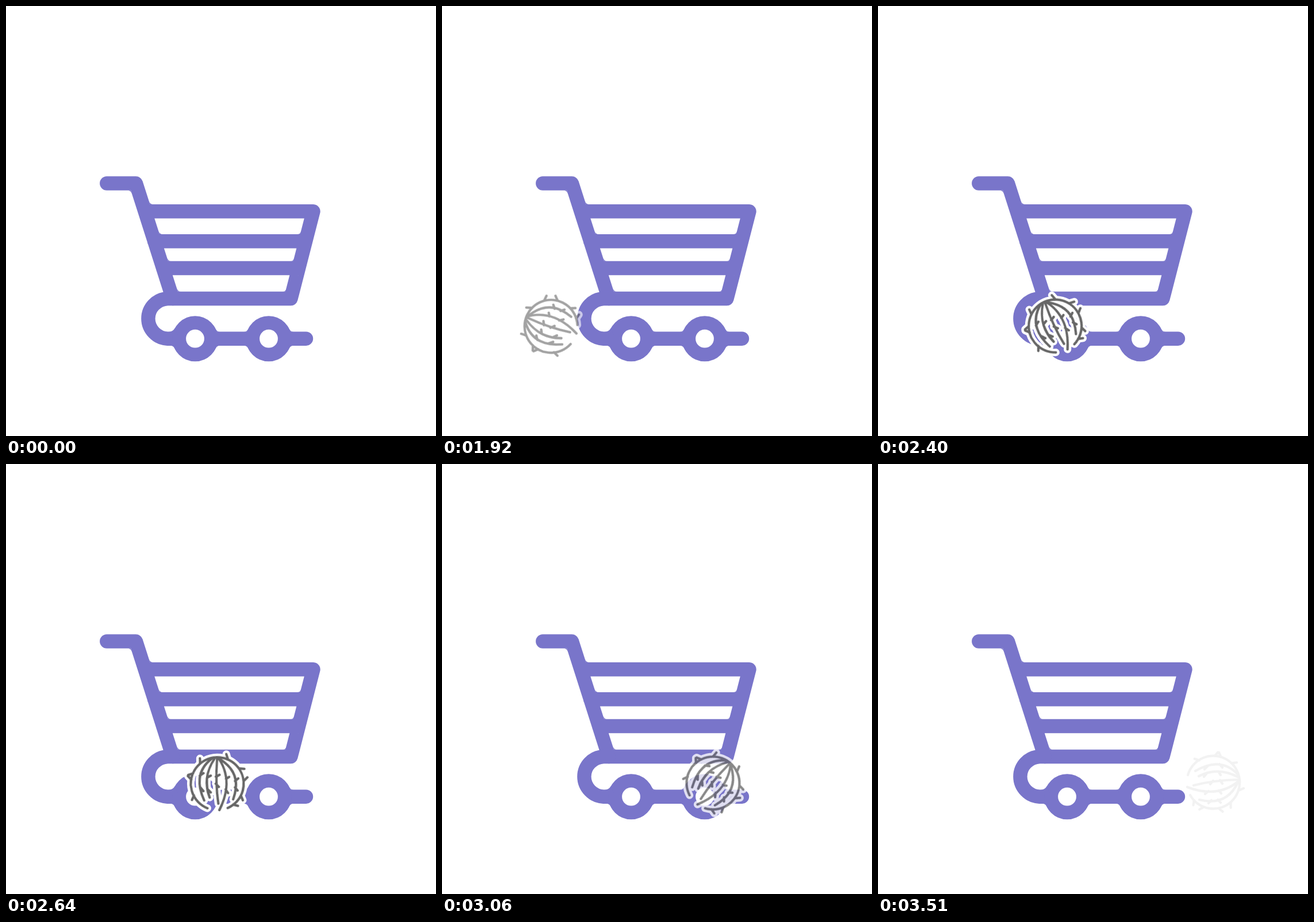
Animation of 748 by 748 pixels, one loop 9840 ms. Source, as an HTML page:

```html
<!DOCTYPE html>
<html lang="en">
<head>
<meta charset="utf-8">
<title>Cart and tumbleweed</title>
<style>
  html, body { margin: 0; width: 100%; height: 100%; overflow: hidden; background: #fff; }
  svg { display: block; width: 100vw; height: 100vh; }
  .line { fill: none; stroke-linecap: round; stroke-linejoin: round; }
</style>
</head>
<body>
<svg viewBox="0 0 748 748">
  <defs>
    <filter id="soft" x="-20%" y="-20%" width="140%" height="140%">
      <feGaussianBlur stdDeviation=".7"/>
    </filter>
    <path id="weed" class="line"/>
    <g id="wheel">
      <circle r="27.7" fill="#fff" stroke="#7975ca" stroke-width="23.6"/>
      <path id="flare" d="M34-20Q37-12 43-12H34ZM34 20Q37 12 43 12H34Z" fill="#7975ca"/>
      <use href="#flare" transform="scale(-1 1)"/>
    </g>
  </defs>

  <g class="line" stroke="#7975ca" stroke-width="24.4">
    <path d="M175.3 308.5H226L290 509H495.500L534.500 357.300H242M258 409.200H520M273 456H508"/>
    <path d="M290 509H281A35.500 34.900 0 0 0 281 578.700H522"/>
  </g>
  <path id="fillets" fill="#7975ca"/>
  <use href="#wheel" x="329" y="578.7"/>
  <use href="#wheel" x="457" y="578.7"/>
  <path d="M281 567Q290 567.500 294 560L300 575H281Z" fill="#7975ca"/>

  <g id="ball">
    <use href="#weed" stroke="#fff" stroke-width="13"/>
    <use href="#weed" stroke="#666" stroke-width="4.2" filter="url(#soft)"/>
  </g>
</svg>
<script>
const LOOP = 9840, START = 1650, END = 3510, STEP = 30;
const byId = id => document.getElementById(id);

// Rounds the inner corner between a slanted edge and a horizontal one.
const fillet = (x, y, slope, dir, rise = 6) =>
  `M${x - slope * rise} ${y - rise}Q${x} ${y} ${x + 5 * dir} ${y}L${x} ${y}Z`;

const LEFT = 0.318, RIGHT = -0.255;
let corners = fillet(250.6, 345.1, LEFT, 1) + fillet(217, 320.7, LEFT, -1, -6);
for (const y of [397, 443.8, 496.8]) {
  corners += fillet(243 + LEFT * (y - 321), y, LEFT, 1);
  corners += fillet(519 + RIGHT * (y - 370), y, RIGHT, -1);
}
byId('fillets').setAttribute('d', corners);

const polar = (radius, degrees) => {
  const a = degrees * Math.PI / 180;
  return `${radius * Math.cos(a)} ${radius * Math.sin(a)}`;
};
const ring = 'M41-22A46 46 0 1 0 45 13';
const stems = 'M-42 0Q-22-42 25-30M-43 2Q-6-28 46-8M-43 5Q0 4 35-5M-43 9Q-8 28 26 11M-42 14Q-12 46 32 20';
const innerThorns = 'M10 29l6-6M-10 32l-5-6M12 16l5-6M-8 19l-4-6M1 3l5-6M-11 4l-4-6M9-15l6-5M-9-14l-4-5M-7-30l-5-5M4-31l5-5';
const outerThorns = [57, 92, 106, 133, 197, 230, 259, 292, 318]
  .map((a, i) => `M${polar(46, a)}L${polar(53, a + (i % 2 ? 6 : -6))}`).join('');
byId('weed').setAttribute('d', ring + stems + innerThorns + outerThorns);

const ball = byId('ball');
function draw() {
  const t = performance.now() % LOOP;
  const time = Math.min(END, Math.floor(t / STEP) * STEP);
  const p = (time - START) / (END - START);
  const fadeIn = 0.16 + (time - START) * 0.00165;
  const fadeOut = 0.08 + (END - time) * 0.00154;
  ball.setAttribute('opacity', time < START ? 0 : Math.min(1, fadeIn, fadeOut));
  ball.setAttribute('transform', `translate(${122 + 462 * p} ${557 - 3 * p}) rotate(${180 * p})`);
  requestAnimationFrame(draw);
}
draw();
</script>
</body>
</html>
```
